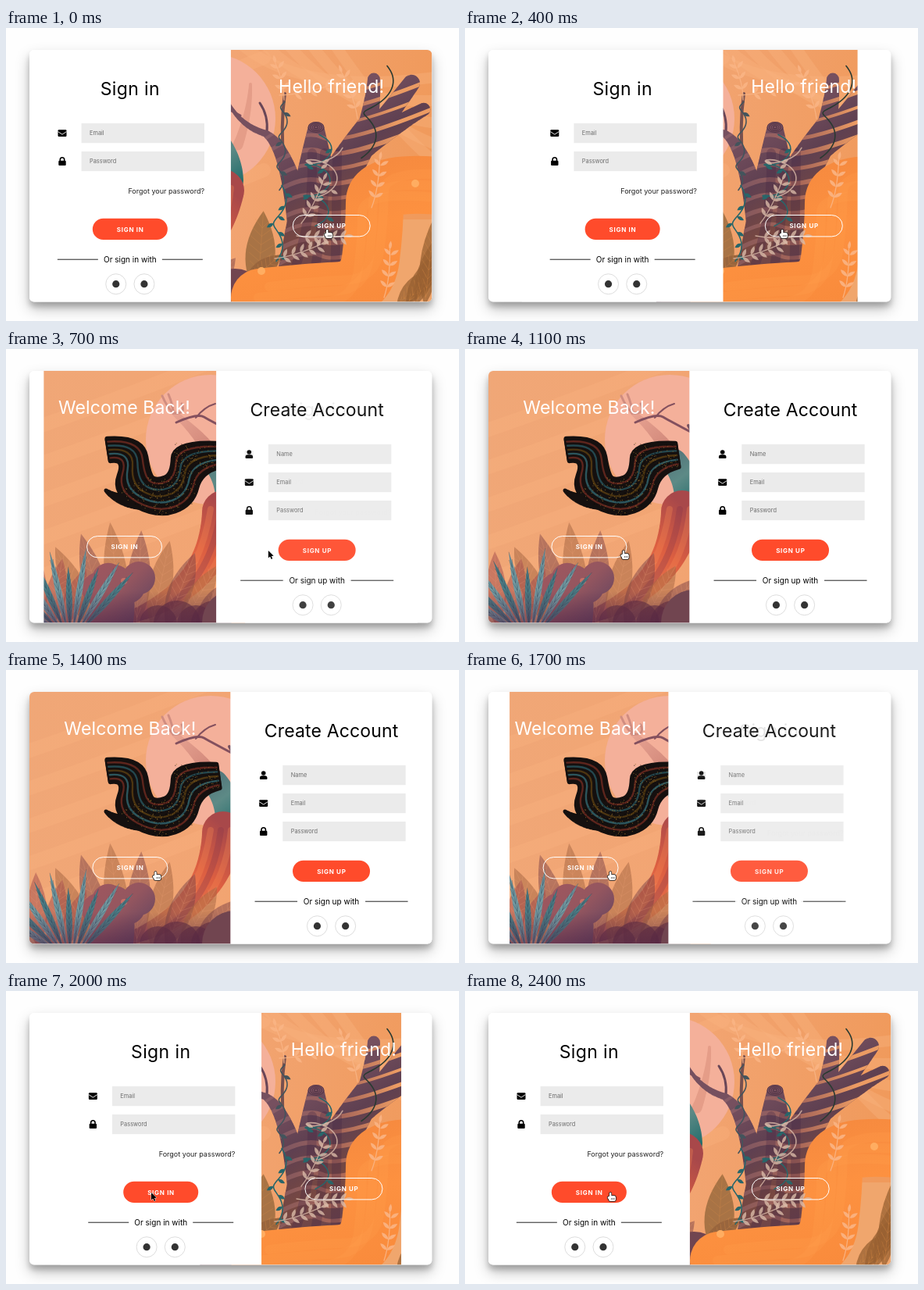
An HTML page with a canvas for the animation above (2.5 s loop, 580 by 375 pixels).

```html
<!DOCTYPE html>
<html lang="en">
<head>
<meta charset="utf-8">
<title>Sliding sign in form</title>
<style>
html, body { margin: 0; width: 100%; height: 100%; overflow: hidden; background: #fefefe; }
canvas { display: block; width: 580px; height: 375px; }
</style>
</head>
<body>
<canvas id="stage"></canvas>
<script>
const W = 580, H = 375, LOOP = 2500, STEP = 100;
const HALF = 257.7, CARD = { x: 30, y: 28, w: 2 * HALF, h: 322.5, r: 6 };
const FONT = 'Inter, "Open Sans", sans-serif';
const TAU = Math.PI * 2;
const ratio = window.devicePixelRatio || 1;

function prepare(canvas) {
  canvas.width = W * ratio;
  canvas.height = H * ratio;
  const ctx = canvas.getContext('2d');
  ctx.scale(ratio, ratio);
  return ctx;
}
const screen2d = prepare(document.getElementById('stage'));
const art = document.createElement('canvas');
let c = prepare(art);

// ---------- drawing helpers ----------
function disc(x, y, r, fill) {
  c.beginPath();
  c.arc(x, y, r, 0, TAU);
  c.fillStyle = fill;
  c.fill();
}
function box(x, y, w, h, r) {
  c.beginPath();
  c.roundRect(x, y, w, h, r);
}
function stroke(color, width) {
  c.strokeStyle = color;
  c.lineWidth = width;
  c.stroke();
}
// Smooth open line through a few guide points.
function line(points, color, width) {
  c.beginPath();
  c.moveTo(...points[0]);
  for (let i = 1; i < points.length - 1; i++) {
    const [x, y] = points[i], [nx, ny] = points[i + 1];
    const end = i === points.length - 2;
    c.quadraticCurveTo(x, y, end ? nx : (x + nx) / 2, end ? ny : (y + ny) / 2);
  }
  c.lineCap = c.lineJoin = 'round';
  stroke(color, width);
}
function grad(x0, y0, x1, y1, ...colors) {
  const g = c.createLinearGradient(x0, y0, x1, y1);
  colors.forEach((col, i) => g.addColorStop(i / (colors.length - 1), col));
  return g;
}
function seeded(s) {
  return () => (s = (s * 16807) % 2147483647) / 2147483647;
}
// Tapered limb from a to b, bent towards m.
function limb(path, a, m, b, w0, w1) {
  for (let i = 0; i <= 80; i++) {
    const k = i / 80, q = 1 - k, r = (w0 + (w1 - w0) * k) / 2;
    const [x, y] = [0, 1].map(n => q * q * a[n] + 2 * q * k * m[n] + k * k * b[n]);
    path.moveTo(x + r, y);
    path.arc(x, y, r, 0, TAU);
  }
  return path;
}
function drawLimb(fill, ...shape) {
  c.fillStyle = fill;
  c.fill(limb(new Path2D(), ...shape));
}
function clipped(shape, draw) {
  c.save();
  shape();
  c.clip();
  draw();
  c.restore();
}

// ---------- plants ----------
function leaf(x, y, angle, len, wide, fill, rib) {
  c.save();
  c.translate(x, y);
  c.rotate(angle);
  c.beginPath();
  c.moveTo(0, 0);
  c.quadraticCurveTo(len * .45, -wide, len, 0);
  c.quadraticCurveTo(len * .45, wide, 0, 0);
  c.fillStyle = fill;
  c.fill();
  if (rib) {
    c.beginPath();
    c.moveTo(0, 0);
    c.lineTo(len, 0);
    for (let k = .1; k < .85; k += .1) {
      const r = wide * 1.6 * k * (1 - k);
      c.moveTo(len * (k + .1), -r);
      c.lineTo(len * k, 0);
      c.lineTo(len * (k + .1), r);
    }
    stroke(rib, .6);
  }
  c.restore();
}
function sprig(x, y, angle, len, pairs, color) {
  c.save();
  c.translate(x, y);
  c.rotate(angle);
  line([[0, 0], [len * .4, 5], [len, 0]], color, 1.3);
  for (let i = 1; i <= pairs; i++)
    for (const side of [-.9, .9]) leaf(len * i / (pairs + .5), 2, side, 12, 4.5, color);
  leaf(len, 0, 0, 11, 4, color);
  c.restore();
}
function coil(x0, y0, x1, y1, amp, turns, color, leaves = 0) {
  const p = [];
  for (let i = 0; i <= 30; i++) {
    const k = i / 30, a = k * turns * TAU;
    p.push([x0 + (x1 - x0) * k + Math.sin(a) * amp, y0 + (y1 - y0) * k + Math.cos(a) * amp * .5]);
  }
  line(p, color, 1.6);
  for (let i = 0; i < leaves; i++) {
    const [x, y] = p[Math.floor(30 * (i + .5) / leaves)];
    leaf(x, y, i % 2 ? 2.6 : .5, 10, 4.5, color);
  }
}

// ---------- illustration ----------
function sky() {
  c.fillStyle = grad(30, 28, 545, 90, '#f0a777', '#f2a573', '#f09a5c');
  c.fillRect(30, 28, 516, 323);
  for (let i = 0; i < 5; i++) {
    const y = 50 + i * 48;
    line([[10, y + 60], [130, y + 20], [330, y - 60]], 'rgba(249,180,130,.28)', 18);
    line([[300 + i * 30, 20], [380 + i * 30, 90 + i * 12], [570, 60 + i * 32]], 'rgba(247,178,125,.4)', 14);
  }
  disc(262, 116, 83, '#f4b09a');
}

function woman() {
  drawLimb('#e59d88', [297, 150], [312, 110], [313, 72], 13, 4);
  drawLimb(grad(215, 80, 275, 145, '#e8a493', '#c97d70'), [272, 148], [252, 112], [213, 80], 23, 6);
  for (const [x, y] of [[200, 60], [208, 58], [225, 70]]) line([[214, 82], [x + 6, y + 14], [x, y]], '#d08d80', 3);
  line([[218, 94], [245, 82], [262, 92], [300, 112]], '#83505e', 3);
  line([[243, 88], [254, 74], [268, 70]], '#83505e', 2);
  drawLimb(grad(250, 130, 302, 200, '#4f6d76', '#5d8a86', '#1f6b6a'), [268, 144], [286, 168], [286, 195], 32, 36);
  const skin = grad(290, 210, 170, 345, '#a8484a', '#dd5f41', '#e87a50', '#9a5058');
  drawLimb(skin, [278, 208], [264, 312], [150, 346], 54, 15);
  for (let i = 0; i < 3; i++)
    line([[262 + i * 13, 205], [250 + i * 14, 280 + i * 10], [205, 326 + i * 5]],
      i % 2 ? 'rgba(130,50,75,.3)' : 'rgba(248,140,85,.3)', 8);
}

function hair() {
  // Each guide point carries the direction in which the strands spread.
  const guide = [[132, 129, .1, .65], [164, 126, -.5, .65], [160, 174, -1.1, .5], [194, 192, 0, 1.1],
    [226, 180, .6, .9], [232, 138, .8, .9], [271, 136, .1, .7]];
  const strand = (off, color, width) =>
    line(guide.map(([x, y, dx, dy]) => [x + dx * off, y + dy * off]), color, width);
  for (let off = -21; off <= 21; off += 3) strand(off, '#15100f', 7);
  drawLimb('#15100f', [185, 192], [150, 200], [128, 181], 28, 5);
  ['#5d251d', '#24474e', '#4c3511', '#2c555c', '#5d251d'].forEach((col, i) => strand(i * 8 - 16, col, 2.4));
  const rnd = seeded(91);
  for (let i = 0; i < 500; i++)
    strandDot(guide, 2 + rnd() * 4, rnd() * 40 - 20, rnd() < .5 ? '#96702b' : '#0d0908');
}
function strandDot(guide, at, off, color) {
  const i = Math.min(Math.floor(at), guide.length - 2), k = at - i;
  const [x, y] = [0, 1].map(n => {
    const near = guide[i][n] + guide[i][n + 2] * off, far = guide[i + 1][n] + guide[i + 1][n + 2] * off;
    return near + (far - near) * k;
  });
  c.fillStyle = color;
  c.fillRect(x, y, .9, .9);
}

function undergrowth() {
  const rib = 'rgba(238,160,120,.35)';
  for (let i = 0; i < 8; i++)
    leaf(110 + i * 19, 356, -2 + i * .16, 135 - Math.abs(i - 2) * 11, 30,
      i % 2 ? 'rgba(125,66,70,.5)' : 'rgba(170,104,68,.55)', rib);
  for (let i = 0; i < 4; i++) leaf(25 + i * 16, 356, -1.8 + i * .2, 105 - i * 8, 26, 'rgba(160,72,74,.5)', rib);
  const plum = grad(105, 270, 180, 350, '#a0575f', '#94565f', '#5e4260');
  for (let i = 0; i < 5; i++) disc(118 + i * 13, 300 + 7 * Math.cos(i * 2.4), 21, plum);
  drawLimb(plum, [138, 300], [140, 325], [132, 356], 48, 60);
  disc(151, 297, 4, '#c96f66');
  for (let i = 0; i < 5; i++) disc(195 + i * 24, 352, 24 + i % 2 * 6, 'rgba(96,46,66,.6)');
  for (let i = 0; i < 10; i++)
    leaf(62 + i * 4, 358, -2.55 + i * .19, 72 + 32 * Math.abs(Math.sin(i * 1.3)), 8,
      i % 2 ? '#4d7c84' : '#7499a0', 'rgba(35,65,85,.5)');
  c.fillStyle = grad(0, 310, 0, 352, 'rgba(78,35,69,0)', 'rgba(78,35,69,.55)');
  c.fillRect(30, 310, 258, 42);
}

function tree() {
  disc(432, 232, 37, '#9d6138');
  line([[357, 84], [351, 125], [356, 175]], '#76504f', 4);
  line([[334, 133], [336, 112], [325, 96]], '#694657', 3);
  const wood = new Path2D();
  limb(wood, [397, 131], [396, 220], [398, 340], 22, 108);
  limb(wood, [408, 240], [424, 190], [464, 132], 58, 38);
  for (const [deg, len, wide] of [[-77, 102, 16], [-53, 118, 22], [-35, 106, 17]]) {
    const a = deg * Math.PI / 180, tip = [448 + len * Math.cos(a), 165 + len * Math.sin(a)];
    limb(wood, [455, 155], [460 + len * .4 * Math.cos(a), 150 + len * .4 * Math.sin(a)], tip, 30, wide);
  }
  limb(wood, [286, 98], [302, 126], [332, 135], 4, 9);
  limb(wood, [332, 135], [361, 152], [376, 250], 9, 32);
  c.fillStyle = grad(350, 140, 450, 300, '#76505f', '#5f4051', '#784841', '#684450');
  c.fill(wood);
  c.save();
  c.clip(wood);
  const stripe = grad(350, 0, 500, 0, 'rgba(154,106,112,.5)', 'rgba(186,112,92,.75)', '#eb9b63');
  for (let i = -3; i < 13; i++) {
    const y = 120 + i * 19;
    line([[330, y + 42], [380, y + 8], [430, y + 32], [560, y - 22]], stripe, 5 + i % 2);
  }
  for (let i = 0; i < 3; i++)
    line([[352 + i * 34, 350], [395 + i * 14, 265], [392 + i * 16, 160]], 'rgba(67,38,66,.3)', 12);
  c.restore();
  for (let r = 10; r > 0; r -= 2.5) {
    c.beginPath();
    c.ellipse(397, 127, r, r * .65, 0, 0, TAU);
    c.fillStyle = '#7d5362';
    c.fill();
    stroke('#543647', 1.1);
  }
}

function serpent() {
  disc(293, 350, 42, '#714550');
  leaf(322, 342, -1.5, 108, 38, '#a87345', 'rgba(222,146,76,.4)');
  leaf(305, 330, -.7, 62, 25, '#99653d', 'rgba(222,146,76,.4)');
  c.fillStyle = '#f0a66d';
  c.fillRect(478, 245, 68, 106);
  for (let i = 0; i < 4; i++)
    leaf(500 + i * 12, 356, -.8 - i * .22, 68 + i * 16, 24, 'rgba(153,96,50,.75)', 'rgba(242,154,76,.35)');
  const path = [[575, 204], [472, 192], [472, 255], [462, 335], [385, 338], [325, 345]];
  line(path, grad(430, 165, 480, 350, '#f5893f', '#fd9140', '#f98b3c'), 74);
  for (let i = 0; i < 3; i++)
    line(path.map(([x, y]) => [x + 12 - i * 14, y - 14 + i * 14]), 'rgba(255,160,78,.22)', 12);
  for (const [x, y] of [[524, 199], [327, 311]]) disc(x, y, 5, '#ffad61');
}

function vines() {
  const teal = '#28666a', dark = '#293a31', peach = 'rgba(249,180,132,.9)', grey = 'rgba(218,186,168,.8)';
  coil(350, 205, 357, 92, 5, 3, '#43545c', 3);
  coil(346, 295, 353, 205, 7, 1.5, teal, 7);
  coil(396, 245, 401, 145, 17, 2.5, teal, 6);
  coil(455, 160, 488, 55, 13, 1.5, dark);
  coil(400, 205, 410, 150, 22, 1.2, grey, 4);
  sprig(356, 92, -1.8, 48, 3, peach);
  sprig(350, 86, -.2, 70, 3, peach);
  for (const [x, y, a] of [[344, 295, -.3], [372, 266, 0], [378, 250, -1.1]]) sprig(x, y, a, 62, 5, grey);
  for (const [x, y, a] of [[484, 345, -1.45], [468, 230, -1.4], [450, 116, -1.9]]) sprig(x, y, a, 62, 4, peach);
}

[sky, woman, hair, undergrowth, tree, serpent, vines].forEach(layer => layer());
c = screen2d;

// ---------- interface ----------
function text(str, x, y, size, color, { weight = 400, align = 'center', gap = 0 } = {}) {
  c.font = `${weight} ${size}px ${FONT}`;
  c.letterSpacing = gap + 'px';
  c.textAlign = align;
  c.fillStyle = color;
  c.fillText(str, x, y);
}

const icons = {
  user(x, y) {
    disc(x, y - 2.6, 2.8, '#000');
    box(x - 4.8, y + .6, 9.6, 4.9, [3.2, 3.2, 1, 1]);
    c.fill();
  },
  mail(x, y) {
    c.fillStyle = '#000';
    box(x - 5.5, y - 4.3, 11, 8.6, 1.2);
    c.fill();
    c.beginPath();
    c.moveTo(x - 5.5, y - 2);
    c.lineTo(x, y + 1.6);
    c.lineTo(x + 5.5, y - 2);
    stroke('#fff', .9);
  },
  lock(x, y) {
    c.fillStyle = '#000';
    box(x - 4.7, y - .8, 9.4, 6.3, 1.1);
    c.fill();
    c.beginPath();
    c.arc(x, y - 2.2, 2.7, Math.PI, 0);
    c.lineTo(x + 2.7, y);
    c.moveTo(x - 2.7, y);
    c.lineTo(x - 2.7, y - 2.2);
    stroke('#000', 1.6);
  }
};

function pill(label, x, w, fill) {
  const y = fill ? 243.7 : 239.5;
  box(x - w / 2, y, w, 27.4, 13.7);
  if (fill) {
    c.fillStyle = fill;
    c.fill();
  } else stroke('#fff', 1);
  text(label, x + .3, y + 16.8, 8, '#fff', { weight: 700, gap: .7 });
}

const signIn = {
  title: 'Sign in', gap: .4, fields: [['mail', 'Email'], ['lock', 'Password']],
  link: 'Forgot your password?', action: 'SIGN IN', wide: 96, hint: 'Or sign in with', rule: [41, 93]
};
const signUp = {
  title: 'Create Account', gap: .15, fields: [['user', 'Name'], ['mail', 'Email'], ['lock', 'Password']],
  action: 'SIGN UP', wide: 99, hint: 'Or sign up with', rule: [43.5, 98]
};

function form(f, shift, alpha) {
  const mid = CARD.x + HALF / 2;
  c.save();
  c.globalAlpha = alpha;
  c.translate(shift, 0);
  c.fillStyle = '#fff';
  c.fillRect(CARD.x, CARD.y, HALF, CARD.h);
  text(f.title, mid, 85.5, 23, '#000', { gap: f.gap });
  f.fields.forEach(([icon, label], i) => {
    const y = 134.6 + i * 36;
    icons[icon](72, y);
    c.fillStyle = '#ebebeb';
    c.fillRect(96.6, y - 12.6, 157.4, 25.2);
    text(label, 107, y + 2.7, 7.4, '#6c6c6c', { align: 'left' });
  });
  if (f.link) text(f.link, 254, 212.3, 9, '#222', { align: 'right' });
  pill(f.action, mid, f.wide, '#ff4b2b');
  text(f.hint, mid, 299.7, 10, '#000');
  const [near, far] = f.rule;
  for (const side of [-1, 1]) {
    c.fillStyle = '#222';
    c.fillRect(mid + side * near, 295.7, side * (far - near), 1);
    const x = mid + side * 18.1;
    c.beginPath();
    c.arc(x, 327.7, 13, 0, TAU);
    stroke('#ddd', 1);
    disc(x, 327.7, 4.6, '#333');
  }
  c.restore();
}

function panel(shift) {
  const x = CARD.x + HALF - shift;
  clipped(() => box(x, CARD.y, HALF, CARD.h, 0), () => {
    c.drawImage(art, 0, 0, W, H);
    const right = 416.7 + shift * .4, left = 158.9 - (HALF - shift) * .4;
    text('Hello friend!', right, 83, 23, '#fff', { gap: .2 });
    pill('SIGN UP', right, 99);
    text('Welcome Back!', left, 83, 23, '#fff', { gap: .1 });
    pill('SIGN IN', left, 96);
  });
}

function arrow() {
  c.beginPath();
  for (const [x, y] of [[0, 0], [0, 9.5], [2.2, 7.5], [3.8, 11], [5.4, 10.2], [3.9, 6.9], [6.8, 6.7]]) c.lineTo(x, y);
  c.closePath();
  stroke('#fff', 1);
  c.fillStyle = '#000';
  c.fill();
}
function hand() {
  c.beginPath();
  c.roundRect(-1, 0, 2.4, 8, 1.2);
  c.roundRect(-2, 4, 9, 7, 2.2);
  c.roundRect(-3.4, 5, 3, 3, 1.5);
  stroke('#111', 1.4);
  c.fillStyle = '#fff';
  c.fill();
  c.beginPath();
  for (let x = 1.6; x < 6; x += 1.8) {
    c.moveTo(x, 7);
    c.lineTo(x, 9);
  }
  stroke('#111', .6);
}

// ---------- motion ----------
const span = (t, from, to) => Math.min(1, Math.max(0, (t - from) / (to - from)));
const smooth = k => k * k * (3 - 2 * k);

// CSS ease-in-out: cubic-bezier(.42, 0, .58, 1)
function easeInOut(x) {
  let lo = 0, hi = 1;
  for (let i = 0; i < 24; i++) {
    const u = (lo + hi) / 2;
    if (1.26 * u * (1 - u) ** 2 + 1.74 * u * u * (1 - u) + u ** 3 < x) lo = u; else hi = u;
  }
  return smooth(lo);
}
const progress = t => easeInOut(span(t, 240, 806)) - easeInOut(span(t, 1565, 2162));

function pointer(t) {
  const onButton = t < 500 || (t >= 1000 && t < 1900) || t >= 2200;
  const x = 411 - 5 * span(t, 0, 400) - 205 * smooth(span(t, 415, 1140)) - 15 * smooth(span(t, 1100, 1600));
  c.save();
  c.translate(x, 258);
  if (onButton) hand(); else arrow();
  c.restore();
}

function cardShape() { box(CARD.x, CARD.y, CARD.w, CARD.h, CARD.r); }
function shadow(dy, blur, alpha) {
  c.save();
  c.shadowColor = `rgba(0,0,0,${alpha})`;
  c.shadowOffsetY = dy * ratio;
  c.shadowBlur = blur * ratio;
  c.fillStyle = '#fff';
  cardShape();
  c.fill();
  c.restore();
}

function render(t) {
  const p = progress(t), shift = p * HALF;
  c.fillStyle = '#fefefe';
  c.fillRect(0, 0, W, H);
  shadow(9, 18, .25);
  shadow(6, 7, .2);
  clipped(cardShape, () => {
    panel(shift);
    form(signIn, shift, 1);
    if (p > .375) form(signUp, shift, p);
  });
  pointer(t);
}

let start = null, last = -1;
function tick(now) {
  if (start === null) start = now;
  const t = Math.floor(((now - start) % LOOP) / STEP) * STEP;
  if (t !== last) render(last = t);
  requestAnimationFrame(tick);
}
requestAnimationFrame(tick);
</script>
</body>
</html>
```
